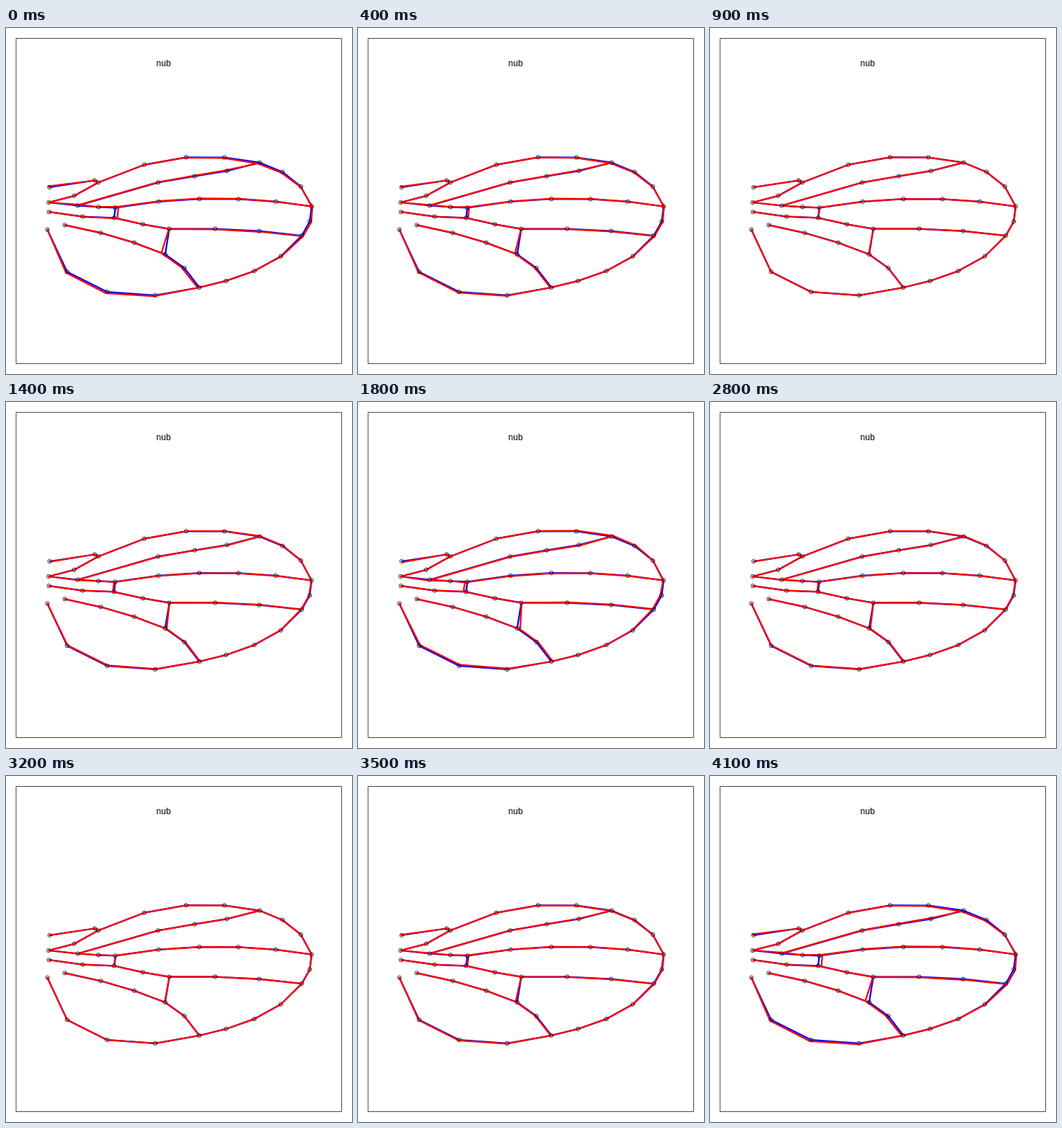
Recreate the animation shown at these times as an HTML page with a canvas. Size 480 px wide and 480 px high, loop 4.2 s.

```html
<!DOCTYPE html>
<html lang="en">
<head>
<meta charset="utf-8">
<title>Wing shape</title>
<style>
html, body { margin: 0; width: 100%; height: 100%; overflow: hidden; background: #fff; }
canvas { display: block; width: 480px; height: 480px; }
</style>
</head>
<body>
<canvas id="stage" width="480" height="480"></canvas>
<script>
const ctx = document.getElementById('stage').getContext('2d');
const STEP = 100, LAST = 20, COUNT = 2 * (LAST + 1);

// Vein ends and junctions: mean x, y and, where they move, the sweep's reach.
const root = [60.5, 221, -2, -1.4], spur = [123, 211.5], fork = [128.2, 214.3];
const base = [59.2, 242], split = [99.5, 246.5, 2.5, -1.4], knee = [128.3, 248.3];
const crossTop = [151.7, 249.3, 4.3, -1.5], crossEnd = [150, 263.4, 4.5, .8];
const bend = [211, 214.4, 0, -.5], crest = [352, 186.7, -3, 1.3];
const tip = [424, 247.5, 1, .2], heel = [410.3, 288, 1.8, 1];
const midRoot = [59.6, 255.2], midFork = [226.6, 278.6, -.6, .3];
const lowRoot = [81.5, 273.3], lowFork = [220.8, 314, -5.2, -1.8];
const rim = [268.3, 360, -2.3, .3], tail = [57.4, 279.7];

// A vein runs from p to q in n even parts, bowed by a bulge and a skew;
// swell is how much the bow itself grows with the sweep.
const vein = (p, q, n = 1, bulge = [0, 0], skew = [0, 0], swell = 0) =>
  ({ p, q, n, bulge, skew, swell });

const veins = [
  vein(root, spur), vein(spur, fork),
  vein(base, fork, 2, [1, 4.65]),
  vein(fork, crest, 4, [9.8, -21.2], [-1.1, 4.8]),
  vein(crest, tip, 3, [9.3, -8.2], [2.5, 0]),
  vein(tip, heel, 2, [4.15, .75], [0, 0], .2),
  vein(heel, rim, 4, [5.2, 13.1], [-6.7, -2.3], -.04),
  vein(rim, tail, 4, [-22.6, 46.2], [-22.4, 9.9], .035),
  vein(base, split), vein(split, knee), vein(knee, crossTop),
  vein(crossTop, tip, 5, [7.8, -11.6], [-1, 1.4]),
  vein(split, bend),
  vein(bend, crest, 3, [2.9, 1.6], [-3.9, 3.2], -.6),
  vein(midRoot, crossEnd, 2, [1.5, 2.4]),
  vein(crossEnd, midFork, 2, [1.7, 1.4]),
  vein(midFork, heel, 3, [2.6, -3.6], [0, 0], -.1),
  vein(lowRoot, lowFork, 3, [4, -2.9]),
  vein(lowFork, rim, 2, [2.85, -4]),
  vein(crossTop, crossEnd), vein(midFork, lowFork)
];

const place = ([x, y, dx = 0, dy = 0], k) => [x + k * dx, y + k * dy];

function trace({ p, q, n, bulge, skew, swell }, k) {
  const from = place(p, k), to = place(q, k);
  return Array.from({ length: n + 1 }, (_, i) => {
    const t = i / n, arch = 4 * t * (1 - t) * (1 + k * swell);
    return from.map((v, j) =>
      v + (to[j] - v) * t + arch * (bulge[j] + skew[j] * (2 * t - 1)));
  });
}

function drawWing(color, k) {
  ctx.strokeStyle = color;
  ctx.lineWidth = 2.25;
  ctx.lineCap = ctx.lineJoin = 'round';
  ctx.beginPath();
  for (const v of veins) {
    trace(v, k).forEach(([x, y], i) => ctx[i ? 'lineTo' : 'moveTo'](x, y));
  }
  ctx.stroke();
}

// One ring per landmark, even where veins share it.
const marks = new Map(veins.flatMap(v => trace(v, 0)).map(p => [p.map(Math.round).join(), p]));

function drawMarks() {
  ctx.strokeStyle = '#000';
  ctx.lineWidth = .75;
  for (const [x, y] of marks.values()) {
    ctx.beginPath();
    ctx.arc(x, y, 2.7, 0, 2 * Math.PI);
    ctx.stroke();
  }
}

function draw(k) {
  ctx.fillStyle = '#fff';
  ctx.fillRect(0, 0, 480, 480);
  ctx.strokeStyle = '#000';
  ctx.lineWidth = .75;
  ctx.strokeRect(14.4, 14.4, 451.2, 451.2);
  ctx.fillStyle = '#000';
  ctx.font = '12px "Liberation Sans", Arial, sans-serif';
  ctx.fillText('nub', 208.6, 53);
  drawWing('#00f', 0);
  drawWing('#f00', k);
  drawMarks();
}

// Sweep forth and back in even steps, holding both ends for two steps.
function tick() {
  const n = Math.floor(performance.now() / STEP) % COUNT;
  const i = n <= LAST ? n : COUNT - 1 - n;
  draw(1 - 2 * i / LAST);
  requestAnimationFrame(tick);
}
tick();
</script>
</body>
</html>
```
